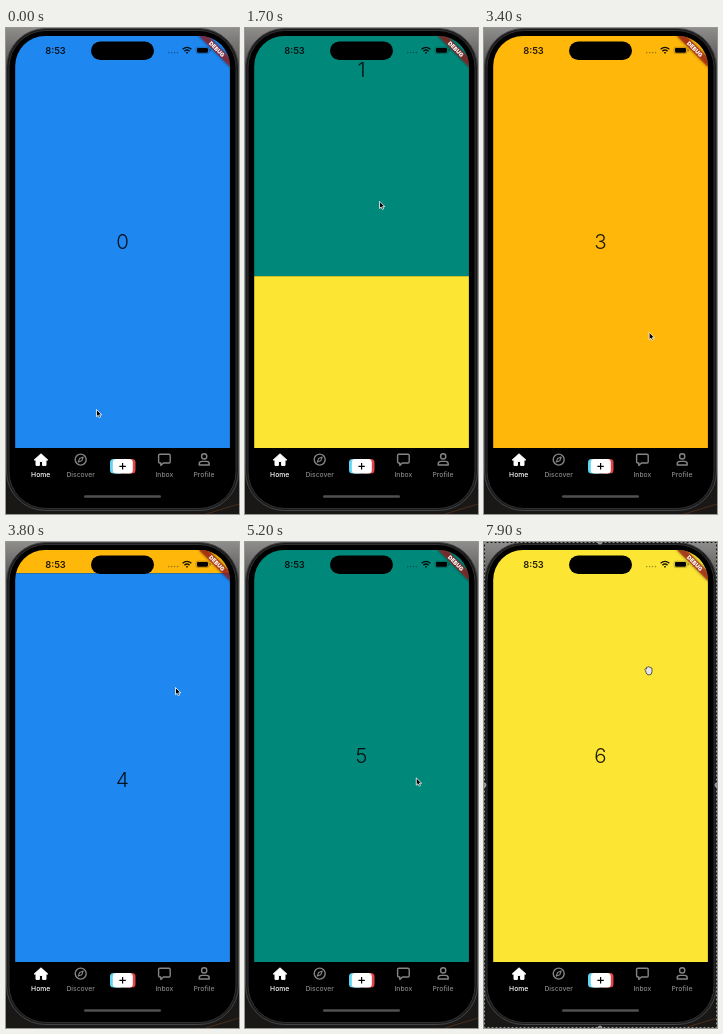
Animation of 233 by 486 pixels, one loop 8 s. Source, as an HTML page:

```html
<!DOCTYPE html>
<html lang="en">
<head>
<meta charset="utf-8">
<title>Swipe feed</title>
<style>
html, body { margin: 0; width: 100%; height: 100%; overflow: hidden; background: #111; }
svg { display: block; width: 100vw; height: 100vh; font-family: Inter, Roboto, sans-serif; }
text { text-anchor: middle; }
.page text { font-size: 20.5px; font-weight: 300; fill: #000; fill-opacity: .87; }
.nav { font-size: 6.8px; font-weight: 500; fill: #858585; }
.icon { fill: none; stroke: #858585; stroke-width: 1.4; stroke-linejoin: round; }
.shadow { filter: blur(1.6px); }
</style>
</head>
<body>
<svg viewBox="0 0 233 486">
  <defs>
    <linearGradient id="desk" x2="0" y2="1">
      <stop offset="0" stop-color="#8f8d8b"/>
      <stop offset=".07" stop-color="#5c5b5a"/>
      <stop offset=".2" stop-color="#161616"/>
      <stop offset="1" stop-color="#191817"/>
    </linearGradient>
    <clipPath id="screen">
      <path d="M9.2 420V38A30 30 0 0 1 39 8H194A30 30 0 0 1 223.9 38V420Z"/>
    </clipPath>
  </defs>

  <rect width="233" height="486" fill="url(#desk)"/>
  <path d="M200 486L233 476" stroke="#4a2c18"/>
  <rect x=".5" y=".5" width="232" height="482" rx="39" fill="#1b1b1c" stroke="#454547"/>
  <rect x="3" y="2.5" width="227" height="478" rx="37" stroke="#303032"/>

  <g clip-path="url(#screen)">
    <g id="pages" class="page"></g>
    <text x="49.5" y="26" font-size="9.4" font-weight="600" fill="#000" fill-opacity=".85">8:53</text>
    <path d="M162.8 24.6h10" stroke="#000" stroke-opacity=".35" stroke-width="1.6" stroke-linecap="round" stroke-dasharray="0 2.9"/>
    <g fill="none" stroke="#000" stroke-opacity=".9" stroke-width="1.4">
      <path d="M176.6 21.2Q181 17.6 185.4 21.2M178.4 23.2Q181 21 183.6 23.2"/>
      <path d="M180.2 24.8h1.6"/>
    </g>
    <rect x="190" y="19.2" width="13" height="6.4" rx="1.9" fill="none" stroke="#000" stroke-opacity=".4" stroke-width=".6"/>
    <rect x="191" y="20.1" width="11" height="4.6" rx="1.1"/>
    <path d="M204.2 21.4v2" stroke="#000" stroke-opacity=".5"/>
    <g transform="translate(224 8) rotate(45)">
      <rect class="shadow" x="-22" y="15.3" width="44" height="6.6" fill-opacity=".5"/>
      <rect x="-22" y="15.3" width="44" height="6.6" fill="#b71c1c" fill-opacity=".63"/>
      <text y="20.6" font-size="5.6" font-weight="900" fill="#fff">DEBUG</text>
    </g>
  </g>
  <rect x="85" y="13.5" width="63" height="18.5" rx="9.25"/>

  <g class="nav">
    <text x="34.7" y="449" fill="#fff">Home</text>
    <text x="74.7" y="449">Discover</text>
    <text x="158.4" y="449">Inbox</text>
    <text x="198" y="449">Profile</text>
  </g>
  <path d="M35 425.8L28.2 432H30V437.4H33.4V433.4H36.6V437.4H40V432H41.8Z" fill="#fff" stroke="#fff" stroke-linejoin="round"/>
  <g class="icon">
    <circle cx="74.7" cy="431.6" r="5.5"/>
    <path d="M77.2 429.1L75.8 432.7L72.2 434.1L73.6 430.5Z" stroke-width="1.1"/>
    <path d="M153.8 426.2H163Q164.2 426.2 164.2 427.4V433.8Q164.2 435 163 435H157.4L154.8 437.4V435H153.8Q152.6 435 152.6 433.8V427.4Q152.6 426.2 153.8 426.2Z"/>
    <circle cx="198.2" cy="428.4" r="2.6"/>
    <path d="M193.2 437V436Q193.2 433.4 196 433.4H200.4Q203.2 433.4 203.2 436V437Z"/>
  </g>
  <rect x="104" y="431" width="14" height="14.5" rx="3.5" fill="#61d4f0"/>
  <rect x="115.5" y="431" width="14" height="14.5" rx="3.5" fill="#e0454b"/>
  <rect x="106.8" y="431" width="20" height="14.5" rx="3.5" fill="#fff"/>
  <path d="M113.4 438.3h6.4M116.6 435.1v6.4" stroke="#000" stroke-width="1.2"/>
  <rect x="78" y="467.2" width="77" height="2.6" rx="1.3" fill="#505050"/>

  <g id="frame">
    <rect x=".5" y=".5" width="232" height="485" fill="none" stroke="#111"/>
    <rect x=".5" y=".5" width="232" height="485" fill="none" stroke="#999" stroke-dasharray="2 2"/>
    <g id="handles" fill="#888" stroke="#bbb" stroke-width=".8"></g>
  </g>
  <path id="arrow" d="M0 0V7.2L1.7 5.8L2.8 8.2L4.1 7.6L3.1 5.3H5.3Z" stroke="#fff" stroke-width=".8"/>
  <path id="hand" d="M161.4 128.6Q160.4 127 161.6 126.6L162.4 127V125.4Q163 124.4 163.7 125.2Q164.6 124.2 165.4 125.2Q166.5 124.6 166.8 125.8Q168 125.6 168 127V129.6Q168 133 165 133Q162.8 133 162.2 130.8Z" fill="#e4e4e4" stroke="#333" stroke-width=".8"/>
</svg>
<script>
const LOOP = 8000, STEP = 100, PAGE = 412, FRAME_AT = 7000;
const colors = ['#1e88f0', '#00897b', '#fce533', '#ffb70a'];

// [start, duration] of each swipe to the next page
const swipes = [[550, 450], [1500, 450], [2481, 450], [3415, 450], [4350, 450], [5360, 340]];

// [time, x, y] of the pointer tip
const pointer = [
  [0, 90.5, 381.5], [500, 94, 381], [900, 123.5, 184.5], [1100, 123.5, 184.5],
  [1450, 127, 310], [1850, 138, 110], [2450, 145, 240], [2700, 147.5, 41.5],
  [3350, 165, 310], [3800, 169.5, 145.5], [4350, 177, 222], [4500, 177.5, 115.5],
  [4700, 175, 60], [5300, 171, 250], [5600, 168.5, 125.5], [LOOP, 168.5, 125.5]
];

const $ = id => document.getElementById(id);
const smooth = u => {
  u = Math.min(1, Math.max(0, u));
  return u * u * (3 - 2 * u);
};

$('pages').innerHTML = Array.from({ length: 7 }, (_, i) => {
  const y = 8 + i * PAGE;
  return `<rect x="9" y="${y}" width="215" height="${PAGE}" fill="${colors[i % 4]}"/>
    <text x="116.5" y="${y + 213.3}">${i}</text>`;
}).join('');

$('handles').innerHTML = [[116, 0], [116, 486], [0, 243], [233, 243]]
  .map(([x, y]) => `<circle cx="${x}" cy="${y}" r="2"/>`).join('');

function pointerAt(t) {
  const i = pointer.findIndex(p => p[0] > t);
  const [a, b] = [pointer[i - 1], pointer[i]];
  const u = smooth((t - a[0]) / (b[0] - a[0]));
  return [a[1] + (b[1] - a[1]) * u, a[2] + (b[2] - a[2]) * u];
}

function draw(now) {
  const t = Math.floor(now % LOOP / STEP) * STEP;
  const page = swipes.reduce((sum, [start, len]) => sum + smooth((t - start) / len), 0);
  const done = t >= FRAME_AT;
  $('pages').setAttribute('transform', `translate(0 ${-page * PAGE})`);
  $('arrow').setAttribute('transform', `translate(${pointerAt(t)})`);
  $('arrow').style.display = done ? 'none' : '';
  $('hand').style.display = $('frame').style.display = done ? '' : 'none';
}

const begin = performance.now();
function tick() {
  draw(performance.now() - begin);
  requestAnimationFrame(tick);
}
tick();
</script>
</body>
</html>
```
